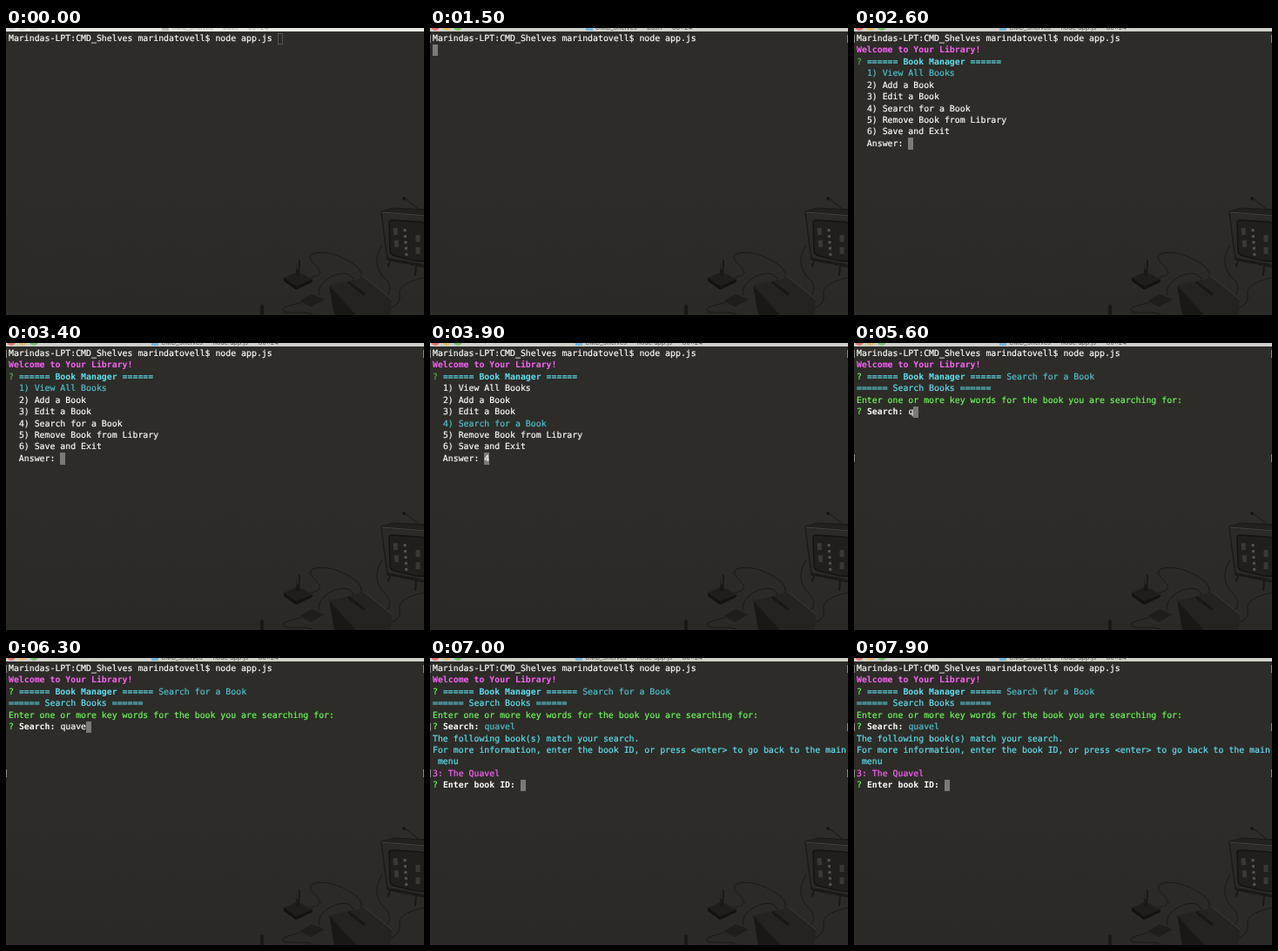
Write an HTML page that moves like this. It is 480x330 px and loops after 8000 ms.

```html
<!DOCTYPE html>
<html lang="en">
<head>
<meta charset="utf-8">
<title>Terminal session</title>
<style>
  html, body { margin: 0; width: 480px; height: 330px; overflow: hidden; }
  body { position: relative; background: linear-gradient(#2d2c28 55%, #2a2925); }
  svg, pre, #bar, #cursor, .mark { position: absolute; }
  svg { left: 0; top: 0; }
  pre {
    left: 3px; top: 6px; margin: 0; color: #fbfbf9;
    font: 9.87px/13.42px "DejaVu Sans Mono", monospace;
    text-rendering: geometricPrecision; font-variant-ligatures: none;
    -webkit-text-stroke: .2px currentColor;
  }
  .c { color: #5ee0f0 } .d { color: #4fc0cf } .g { color: #6cf85a }
  .q { color: #5cab40 } .m { color: #fb62f8 } .b { font-weight: bold; -webkit-text-stroke: 0 }
  #cursor { width: 5.9px; height: 13.4px; background: #7b7a77; box-sizing: border-box; }
  .idle #cursor { background: none; border: 1px dotted #777672; }
  .mark { width: 478px; left: 0; height: 9px; border: solid #8a8985; border-width: 0 1px; }
  #bar {
    left: 0; top: 0; width: 480px; height: 4px; overflow: hidden; background: #cfd0c9;
    display: flex; justify-content: center; color: #555;
    font: 7.4px/8px Inter, sans-serif; white-space: pre;
  }
  #bar i { position: absolute; top: -7px; width: 10px; height: 10px; border-radius: 50%; }
  #bar b { width: 8px; height: 3px; margin-right: 3px; background: #6db9df; }
  #title { margin-top: -4px; }
  .idle #bar { background: #e6e6e3; color: #aaa; }
  .idle #bar i { background: #d4d4d2 !important; }
  .idle #bar b { background: #bbb; }
</style>
</head>
<body>
<svg width="480" height="330" fill="none" stroke="#191815" stroke-linejoin="round" stroke-linecap="round">
  <!-- cables -->
  <g stroke-width="1">
    <path d="M350 287C378 282 341 268 351 261S382 261 392 267 410 278 408 288"/>
    <path d="M360 307C356 300 366 288 378 284S396 283 399 289"/>
    <path d="M338 316C324 319 312 323 320 326S342 325 352 329"/>
    <path d="M432 250C420 268 428 281 436 289S440 306 434 311"/>
    <path d="M480 287C464 291 450 296 452 306S446 320 440 323"/>
  </g>
  <!-- joystick and pad -->
  <g stroke="none">
    <path fill="#1f1e1b" d="M319 287L335 280 352 289 333 297Z"/>
    <path fill="#131210" d="M319 287L333 297 352 289V292L333 301 319 291Z"/>
    <path fill="#1f1e1b" d="M337 314L351 306 366 312 350 321Z"/>
  </g>
  <path stroke-width="4" d="M336 268L335 284M294 320V330"/>
  <path stroke="#3b3a36" d="M335 267V277"/>
  <!-- console -->
  <g stroke="none">
    <path fill="#24231f" d="M371 296L412 287 443 312 441 330H402Z"/>
    <path fill="#191815" d="M371 296L402 330H377Z"/>
  </g>
  <path stroke-width="3" d="M394 293L411 306"/>
  <path stroke="#3b3a36" d="M412 287L443 312"/>
  <!-- television -->
  <path d="M457 195L475 209"/>
  <circle cx="457" cy="196" r="2" fill="#171613" stroke="none"/>
  <path fill="#11100e" stroke="none" d="M474 208H480V215H474Z"/>
  <path fill="#22211e" d="M431 211L445 207 482 209V273L438 265Z"/>
  <path fill="#2b2a26" stroke="none" d="M432 213L482 217V272L439 264Z"/>
  <path stroke="#45433e" d="M432 212L482 216"/>
  <path stroke-width="2" d="M438 266L482 275M441 267L439 274M471 273L470 284"/>
  <path fill="#201f1c" stroke="#141310" stroke-width="1.5" d="M440 224Q439 221 444 221L476 223Q482 223 482 229V268Q474 269 463 266L446 262Q442 261 441 256Z"/>
  <g stroke-linecap="butt">
    <path stroke="#56544e" stroke-width="3" stroke-dasharray="3 4" d="M458 231L460 264"/>
    <path stroke="#3a3833" stroke-width="5" stroke-dasharray="8 6" d="M447 230L449 255M473 238V262"/>
  </g>
</svg>
<div id="bar">
  <i style="left:1px;background:#e8736c"></i><i style="left:14px;background:#e6bd62"></i><i style="left:27px;background:#78c26c"></i>
  <b></b><span id="title"></span>
</div>
<div id="cursor"></div>
<pre id="screen"></pre>
<script>
const LOOP = 8000, CELL = 5.942, ROW = 13.42, LEFT = 3, TOP = 5.6;
const FOCUS = 400, RUN = 1500, RETITLE = 1600, MENU = 1800, PICK = 3600, SEARCH = 4400, RESULT = 6900;
const WORD = 'quavel', KEYS = [5600, 5800, 5900, 6100, 6200, 6400];
const CHOICES = ['View All Books', 'Add a Book', 'Edit a Book', 'Search for a Book',
  'Remove Book from Library', 'Save and Exit'];

const byId = id => document.getElementById(id);
const ink = (style, text) => `<span class="${style}">${text}</span>`;
const heading = ' ' + ink('c b', '====== Book Manager ======');

// Each entered row gets a pair of edge marks.
const marks = [[0, RUN], [9, SEARCH], [5, RESULT]].map(([row, start]) => {
  const el = document.createElement('div');
  el.className = 'mark';
  el.style.top = TOP + 2 + row * ROW + 'px';
  document.body.append(el);
  return { el, start };
});

// Returns the screen rows and the cursor cell [column, row].
function session(t) {
  const rows = ['Marindas-LPT:CMD_Shelves marindatovell$ node app.js'];
  if (t < RUN) return [rows, [52, 0]];
  if (t < MENU) return [rows, [0, 1]];

  rows.push(ink('m b', 'Welcome to Your Library!'));
  if (t < SEARCH) {
    const picked = t < PICK ? 0 : 3;
    rows.push(ink('q', '?') + heading);
    CHOICES.forEach((name, i) => rows.push('  ' + ink(i === picked ? 'd' : '', `${i + 1}) ${name}`)));
    rows.push('  Answer: ' + (t < PICK ? '' : '4'));
    return [rows, [10, 9]];
  }

  const typed = WORD.slice(0, KEYS.filter(k => t >= k).length), done = t >= RESULT;
  const prompt = text => ink('g', '?') + ' ' + ink('b', text) + ' ';
  rows.push(
    ink('g', '?') + heading + ' ' + ink('d', CHOICES[3]),
    ink('c', '====== Search Books ======'),
    ink('g', 'Enter one or more key words for the book you are searching for:'),
    prompt('Search:') + ink(done ? 'd' : '', typed));
  if (!done) return [rows, [10 + typed.length, 5]];

  rows.push(
    ink('c', 'The following book(s) match your search.'),
    ink('c', 'For more information, enter the book ID, or press &lt;enter&gt; to go back to the main'),
    ink('c', ' menu'),
    ink('m', '3: The Quavel'),
    prompt('Enter book ID:'));
  return [rows, [17, 10]];
}

let shown;
function draw() {
  const t = performance.now() % LOOP;
  const [rows, [col, row]] = session(t);
  const html = rows.join('\n');
  if (html !== shown) byId('screen').innerHTML = shown = html;
  byId('cursor').style.left = LEFT + col * CELL + 'px';
  byId('cursor').style.top = TOP + row * ROW + 'px';
  byId('title').textContent = `CMD_Shelves — ${t < RETITLE ? 'bash' : 'node app.js'} — 80×24`;
  document.body.className = t < FOCUS ? 'idle' : '';
  for (const { el, start } of marks) el.hidden = t < start;
  requestAnimationFrame(draw);
}
draw();
</script>
</body>
</html>
```
